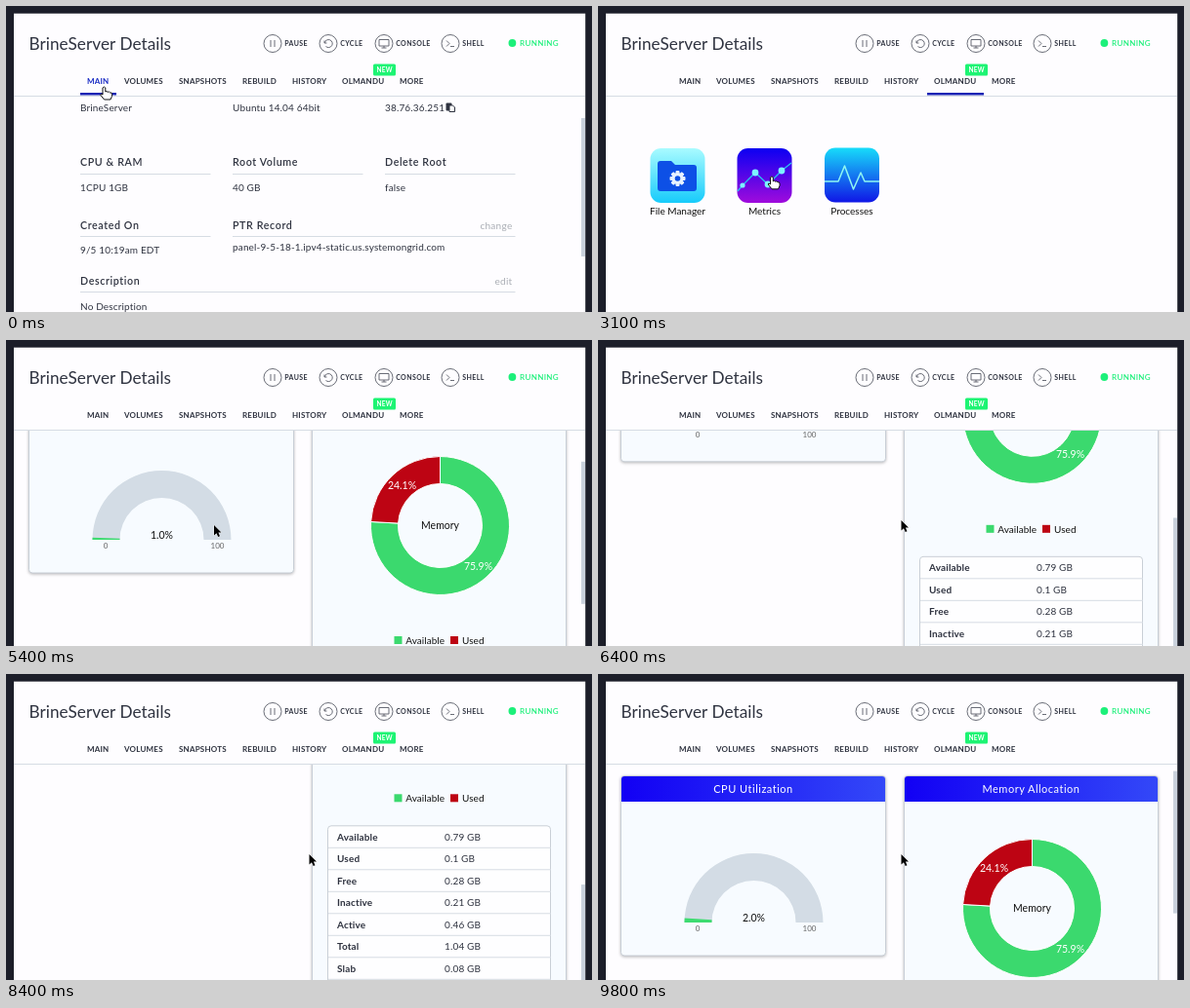
An HTML page that plays this animation: 600x314 px, repeating every 10 s.

```html
<!DOCTYPE html>
<html lang="en">
<head>
<meta charset="utf-8">
<title>Server panel</title>
<style>
  html, body { margin: 0; width: 100%; height: 100%; overflow: hidden; background: #1c1e29; }
  svg { display: block; width: 600px; height: 314px; font: 10px Lato, sans-serif; letter-spacing: .15px; fill: #2f3340; }
  .title { font-size: 17.2px; letter-spacing: .05px; }
  .tool { font-size: 7px; font-weight: 700; letter-spacing: .4px; }
  .nav { font-size: 8px; font-weight: 700; letter-spacing: .2px; }
  .nav.hover { fill: #1a2cc4; }
  .status { font-size: 8px; font-weight: 600; letter-spacing: .35px; fill: #1cf07a; }
  .badge { font-size: 6.5px; font-weight: 700; letter-spacing: .3px; fill: #fff; }
  .head { font-size: 10.7px; font-weight: 600; letter-spacing: .6px; }
  .link { fill: #a9adb4; letter-spacing: .3px; }
  .app { fill: #111; letter-spacing: 0; }
  .card { font-size: 11px; letter-spacing: .5px; fill: #fff; }
  .chart { font-size: 10.5px; letter-spacing: 0; fill: #111; }
  .legend { fill: #111; letter-spacing: .05px; }
  .share { font-size: 10.5px; letter-spacing: 0; fill: #fff; }
  .tick { font-size: 8px; letter-spacing: 0; fill: #666; }
  .key { font-weight: 700; }
  .rule { stroke: #d6dce3; fill: none; }
  .icon { stroke: #5a5d68; stroke-width: .9; fill: none; }
  .panel { fill: #fefdff; filter: blur(.4px); }
  .box { fill: #f7fbff; stroke: #c8ced6; filter: drop-shadow(0 1px 1.5px #0004); }
</style>
</head>
<body>
<svg id="stage" viewBox="0 0 600 314"></svg>
<script>
const LOOP = 10000;
const TABS = [['MAIN', 83, 106], ['VOLUMES', 121, 162], ['SNAPSHOTS', 177, 228], ['REBUILD', 242, 279],
  ['HISTORY', 293, 330], ['OLMANDU', 344, 389], ['MORE', 403, 429]];
const MEMORY = [['Available', '0.79'], ['Used', '0.1'], ['Free', '0.28'], ['Inactive', '0.21'],
  ['Active', '0.46'], ['Total', '1.04'], ['Slab', '0.08']];

// Each step is [time, ...values].
const POINTER = [[0, 100.5, 83], [100, 100.5, 83], [1100, 351, 85], [2300, 351, 85], [3200, 172, 178],
  [3500, 172, 178], [4000, 213, 190], [5600, 213, 190], [6200, 310.5, 185]];
const SCROLL = [[4500, 0], [5300, 65], [5650, 65], [6400, 179], [6600, 214], [6800, 225], [7200, 244],
  [7400, 246], [7700, 246], [8000, 250], [8250, 250], [8400, 246], [9000, 60], [9300, 15]];
const LOAD = [[9350, 1], [9800, 2]];
const OPEN_APPS = 1400, OPEN_METRICS = 3500;

const text = (x, y, label, cls = '', anchor = 'start') =>
  `<text x="${x}" y="${y}" class="${cls}" text-anchor="${anchor}">${label}</text>`;
const rule = (x1, x2, y) => `<path class="rule" d="M${x1} ${y}H${x2}"/>`;
const rect = (x, y, w, h, fill, r = 0) =>
  `<rect x="${x}" y="${y}" width="${w}" height="${h}" rx="${r}" fill="${fill}"/>`;
const gradient = (id, from, to, across) =>
  `<linearGradient id="${id}" x2="${across ? 1 : 0}" y2="${across ? 0 : 1}">
    <stop stop-color="${from}"/><stop offset="1" stop-color="${to}"/></linearGradient>`;

// Ring section; from and to are turns, clockwise from the top.
function ring(cx, cy, from, to, outer = 71, inner = 43) {
  const at = (r, turn) => {
    const a = turn * 2 * Math.PI;
    return `${cx + r * Math.sin(a)} ${cy - r * Math.cos(a)}`;
  };
  const big = to - from > .5 ? 1 : 0;
  return `M${at(outer, from)}A${outer} ${outer} 0 ${big} 1 ${at(outer, to)}` +
    `L${at(inner, to)}A${inner} ${inner} 0 ${big} 0 ${at(inner, from)}Z`;
}

function toolbar() {
  const tools = [
    [273, 'PAUSE', 'M-2 -3.5V3.5M2 -3.5V3.5'],
    [330, 'CYCLE', 'M-4 -3V-.5H-1.5M-3.7 -.7A4 4 0 1 1 -2.5 3'],
    [387, 'CONSOLE', 'M-5 -4H5V2.5H-5ZM0 2.5V4.5M-2.5 4.5H2.5'],
    [455, 'SHELL', 'M-4 -3L-1 0L-4 3M0 3H4']
  ];
  return tools.map(([x, label, d]) =>
    `<g class="icon" transform="translate(${x} 38.5)"><circle r="9"/><path d="${d}"/></g>` +
    text(x + 12.2, 41, label, 'tool')).join('');
}

function mainPage() {
  const heads = [[76, 164, 'CPU &amp; RAM'], [232, 164, 'Root Volume'], [388, 164, 'Delete Root'],
    [76, 229, 'Created On'], [232, 229, 'PTR Record'], [76, 286, 'Description']];
  const values = [[76, 107.5, 'BrineServer'], [232, 107.5, 'Ubuntu 14.04 64bit'], [388, 107.5, '38.76.36.251'],
    [76, 190, '1CPU 1GB'], [232, 190, '40 GB'], [388, 190, 'false'], [76, 254, '9/5 10:19am EDT'],
    [232, 251, 'panel-9-5-18-1.ipv4-static.us.systemongrid.com'], [76, 312, 'No Description']];
  const rules = [[76, 209.5, 172.5], [232, 365.5, 172.5], [388, 521.5, 172.5],
    [76, 209.5, 236.5], [232, 521.5, 236.5], [76, 521.5, 293.5]];
  return heads.map(h => text(...h, 'head')).join('') +
    values.map(v => text(...v)).join('') + rules.map(r => rule(...r)).join('') +
    text(518.5, 229, 'change', 'link', 'end') + text(518.5, 286, 'edit', 'link', 'end') +
    rect(450.5, 99.5, 6, 8, '#2f3340', 1) +
    '<path d="M454 102H457.5L459.5 104V108.5H454Z" fill="#fff" stroke="#2f3340"/>' +
    rect(589, 115, 4, 142, '#cad2dc');
}

function appsPage() {
  const dots = [[148, 184], [161, 171], [174, 183], [188, 169]];
  const teeth = [0, 45, 90, 135].map(a =>
    `<rect x="-2" y="-8" width="4" height="16" rx="1" transform="rotate(${a})"/>`).join('');
  return rect(53.5, 146, 56, 56, 'url(#sky)', 11) +
    '<path d="M61 162q0-3 3-3h11l4 4h19q3 0 3 3v21q0 3-3 3H64q-3 0-3-3Z" fill="#0d50e6"/>' +
    `<g transform="translate(81.5 177)" fill="#e6f2ff">${teeth}<circle r="6"/>
      <circle r="2.8" fill="#0d50e6"/></g>` +
    rect(142.5, 146, 56, 56, 'url(#violet)', 11) +
    `<path d="M143 190L${dots.join('L')}L198 161" fill="none" stroke="#29bdf2" stroke-width="1.3"/>` +
    dots.map(([x, y], i) => `<circle cx="${x}" cy="${y}" r="${i ? 3.4 : 2.6}" fill="#7df3ff"/>`).join('') +
    rect(232, 145.5, 56, 56, 'url(#ocean)', 11) +
    `<path d="M232 180H246L252.5 164L261.5 188L269 171L273 180H288" fill="none"
      stroke="#8ff7f2" stroke-width="1.5" stroke-linejoin="round"/>` +
    text(81.5, 214, 'File Manager', 'app', 'middle') + text(170.5, 214, 'Metrics', 'app', 'middle') +
    text(260, 214, 'Processes', 'app', 'middle');
}

function card(x, w, h, label) {
  return `<rect class="box" x="${x - .5}" y="119.5" width="${w + 1}" height="${h}" rx="3.5"/>` +
    `<path d="M${x} 146V123q0-3 3-3h${w - 6}q3 0 3 3V146Z" fill="url(#band)"/>` +
    text(x + w / 2, 137, label, 'card', 'middle');
}

function metricsPage() {
  const rows = MEMORY.map(([name, size], i) => {
    const y = 401.5 + i * 22.5;
    return text(339, y + 15, name, 'key') + text(449, y + 15, size + ' GB') + rule(330, 558, y + 22.5);
  }).join('');
  return card(24, 270, 184.5, 'CPU Utilization') + card(314, 259, 520, 'Memory Allocation') +
    `<path d="${ring(159.5, 270, -.25, .25)}" fill="#d3dce5"/><path id="load" fill="#3ddb70"/>` +
    '<text id="percent" class="chart" x="159.5" y="269" text-anchor="middle"></text>' +
    text(102, 279, '0', 'tick', 'middle') + text(216.5, 279, '100', 'tick', 'middle') +
    `<g stroke="#fff"><path d="${ring(444.5, 255.5, 0, .759)}" fill="#3bd96e"/>
      <path d="${ring(444.5, 255.5, .759, 1)}" fill="#bd0413"/></g>` +
    text(405.5, 218, '24.1%', 'share', 'middle') + text(483.5, 300.5, '75.9%', 'share', 'middle') +
    text(444.5, 258.5, 'Memory', 'chart', 'middle') +
    rect(397.5, 369, 8, 8, '#3bd96e') + text(409.3, 376.7, 'Available', 'legend') +
    rect(455, 369, 8, 8, '#bd0413') + text(467, 376.7, 'Used', 'legend') +
    '<rect x="329.5" y="401.5" width="228" height="220" rx="3.5" fill="#fefeff" stroke="#c9cfd6"/>' + rows;
}

const $ = id => document.getElementById(id);
$('stage').innerHTML = `<defs>
  ${gradient('sky', '#a9fbff', '#17cbfb')}${gradient('violet', '#0b00f2', '#a00bdc')}
  ${gradient('ocean', '#17dcfa', '#1016e6')}${gradient('band', '#1200f4', '#3348f8', true)}
  <clipPath id="view"><path d="M8 92.5H593V314H8Z"/></clipPath></defs>
  ${rect(0, 0, 600, 314, '#1c1e29')}<rect class="panel" x="8" y="7.7" width="585.2" height="320"/>
  <g clip-path="url(#view)">
    <g id="main">${mainPage()}</g><g id="apps">${appsPage()}</g>
    <g id="metrics"><g id="content">${metricsPage()}</g>
      <rect id="thumb" x="589" width="4" height="146" fill="#cad2dc"/></g>
  </g>
  ${text(23.5, 45, 'BrineServer Details', 'title')}${toolbar()}
  <circle cx="518.4" cy="38" r="3.9" fill="#1cf07a"/>${text(526, 41, 'RUNNING', 'status')}
  ${TABS.map(([name, x]) => text(x, 80, name, 'nav')).join('')}
  ${rect(376, 59.5, 23, 12, '#1df473', 1.5)}${text(387.7, 68, 'NEW', 'badge', 'middle')}
  <path class="rule" d="M8 92.5H593"/>
  <rect id="underline" y="89" height="2.5" fill="#1a24b4"/>
  <g id="pointer" stroke-linejoin="round">
    <path id="arrow" d="M0 0V10.500L2.500 8.300L4.200 12L6 11.200L4.400 7.600H7.500Z"
      fill="#000" stroke="#fff" stroke-width=".8" paint-order="stroke"/>
    <path id="hand" d="M-1.500 1Q0-1 1.300 1V5Q2.500 3.800 3.600 5.300Q5 4.300 5.900 5.900Q7.800 5.300 8 7.300V9.500L6.500 13H0
      L-3.800 8.200Q-4 6.200-1.500 8Z" fill="#fff" stroke="#111"/>
  </g>`;
const tabs = [...document.querySelectorAll('.nav')];

function sample(steps, t, ease = k => k) {
  const next = steps.findIndex(step => step[0] > t);
  if (next < 1) return steps.at(next).slice(1);
  const a = steps[next - 1], b = steps[next];
  const k = ease((t - a[0]) / (b[0] - a[0]));
  return a.slice(1).map((v, i) => v + (b[i + 1] - v) * k);
}
const smooth = k => k * k * (3 - 2 * k);
const show = (id, on) => $(id).setAttribute('visibility', on ? 'visible' : 'hidden');

function draw(now) {
  const t = now % LOOP;
  const [x, y] = sample(POINTER, t, smooth);
  const [scroll] = sample(SCROLL, t);
  const [load] = sample(LOAD, t, smooth);
  const apps = t >= OPEN_APPS && t < OPEN_METRICS;
  const metrics = t >= OPEN_METRICS;

  show('main', t < OPEN_APPS);
  show('apps', apps);
  show('metrics', metrics);
  show('underline', !metrics);
  $('underline').setAttribute('x', apps ? 337 : 76);
  $('underline').setAttribute('width', apps ? 58 : 37);

  $('content').setAttribute('transform', `translate(0 ${-scroll})`);
  $('thumb').setAttribute('y', 92 + scroll * .505);
  $('load').setAttribute('d', ring(159.5, 270, -.25, -.25 + load / 200));
  $('percent').textContent = (load > 1 ? 2 : 1).toFixed(1) + '%';

  const onNav = y < 92;
  tabs.forEach((tab, i) =>
    tab.classList.toggle('hover', onNav && x > TABS[i][1] - 7 && x < TABS[i][2] + 7));
  const hand = onNav || apps && y > 146;
  show('hand', hand);
  show('arrow', !hand);
  $('pointer').setAttribute('transform', `translate(${x} ${y})`);
}

function tick() {
  draw(performance.now());
  requestAnimationFrame(tick);
}
tick();
</script>
</body>
</html>
```
